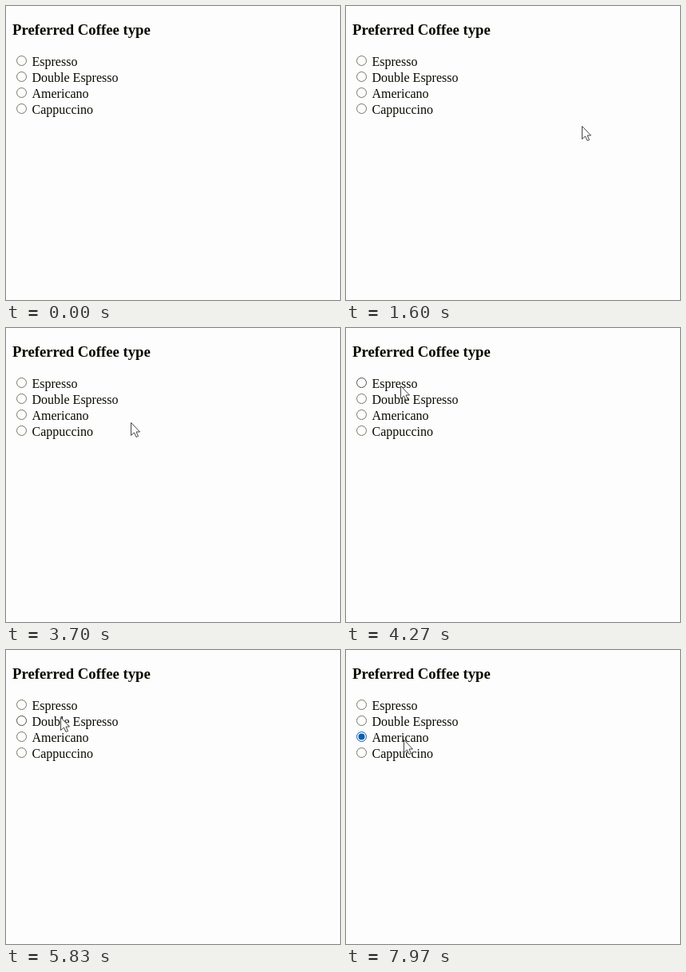
These frames come from a looping animation (418x368 px, 8000 ms). An HTML page with a canvas:

```html
<!DOCTYPE html>
<html lang="en">
<head>
<meta charset="utf-8">
<title>Preferred Coffee type</title>
<style>
  html, body { margin: 0; width: 100%; height: 100%; overflow: hidden; background: #fdfdfd; }
  canvas { display: block; }
</style>
</head>
<body>
<canvas id="stage" width="418" height="368"></canvas>
<script>
const ctx = document.getElementById('stage').getContext('2d');
const LOOP = 8000;
const SELECT_AT = 6600;
const SELECTED = 2;
const TOP = 60;
const ROW = 20;
const SERIF = '"Liberation Serif", serif';
const options = ['Espresso', 'Double Espresso', 'Americano', 'Cappuccino'];

// The pointer enters from the right, then makes one eased move per entry.
const entry = { x: 378, y: 166, at: 1150 };
const moves = [
  { from: 1150, to: 2300, x: 134, y: 118 },
  { from: 2300, to: 2530, x: 156, y: 118 },
  { from: 3700, to: 4250, x: 68, y: 72 },
  { from: 5500, to: 5800, x: 68, y: 84 },
  { from: 5850, to: 6270, x: 72, y: 105 },
  { from: 6700, to: 7100, x: 72, y: 130 },
  { from: 7170, to: 7530, x: 72, y: 112 }
];

const smooth = k => k * k * (3 - 2 * k);
const clamp = k => Math.min(1, Math.max(0, k));

function pointerAt(t) {
  if (t < entry.at) return null;
  let { x, y } = entry;
  for (const m of moves) {
    const k = smooth(clamp((t - m.from) / (m.to - m.from)));
    x += (m.x - x) * k;
    y += (m.y - y) * k;
  }
  return { x: Math.round(x), y: Math.round(y) };
}

function hoveredRow(p) {
  if (!p) return -1;
  const row = Math.floor((p.y - TOP) / ROW);
  if (!options[row]) return -1;
  ctx.font = `16px ${SERIF}`;
  return p.x <= 33 + ctx.measureText(options[row]).width ? row : -1;
}

function text(str, x, y, font) {
  ctx.font = `${font} ${SERIF}`;
  ctx.fillStyle = '#0a0a00';
  ctx.fillText(str, x, y);
}

function disc(x, y, r, fill) {
  ctx.beginPath();
  ctx.arc(x, y, r, 0, Math.PI * 2);
  ctx.fillStyle = fill;
  ctx.fill();
}

function radio(y, checked, hover) {
  const idle = hover ? '#4f4f45' : '#767662';
  const color = checked ? '#0a5fae' : idle;
  disc(19.5, y, 6, '#fdfdfd');
  ctx.strokeStyle = color;
  ctx.stroke();
  if (checked) disc(19.5, y, 4, color);
}

function pointer({ x, y }) {
  ctx.save();
  ctx.translate(x + 0.5, y + 0.5);
  ctx.fillStyle = '#fdfdfd';
  ctx.strokeStyle = '#444';
  const arrow = new Path2D('M0 0V16L4 12.5L6.5 18L9 17L6.5 11.5H11Z');
  ctx.fill(arrow);
  ctx.stroke(arrow);
  ctx.restore();
}

function draw(t) {
  const p = pointerAt(t);
  const hover = hoveredRow(p);
  ctx.fillStyle = '#fdfdfd';
  ctx.fillRect(0, 0, 418, 368);
  text('Preferred Coffee type', 8, 36, 'bold 18.72px');
  options.forEach((name, i) => {
    const y = TOP + i * ROW;
    radio(y + 8.5, i === SELECTED && t >= SELECT_AT, i === hover);
    text(name, 32.5, y + 15, '16px');
  });
  if (p) pointer(p);
}

function tick() {
  draw(performance.now() % LOOP);
  requestAnimationFrame(tick);
}
tick();
</script>
</body>
</html>
```
